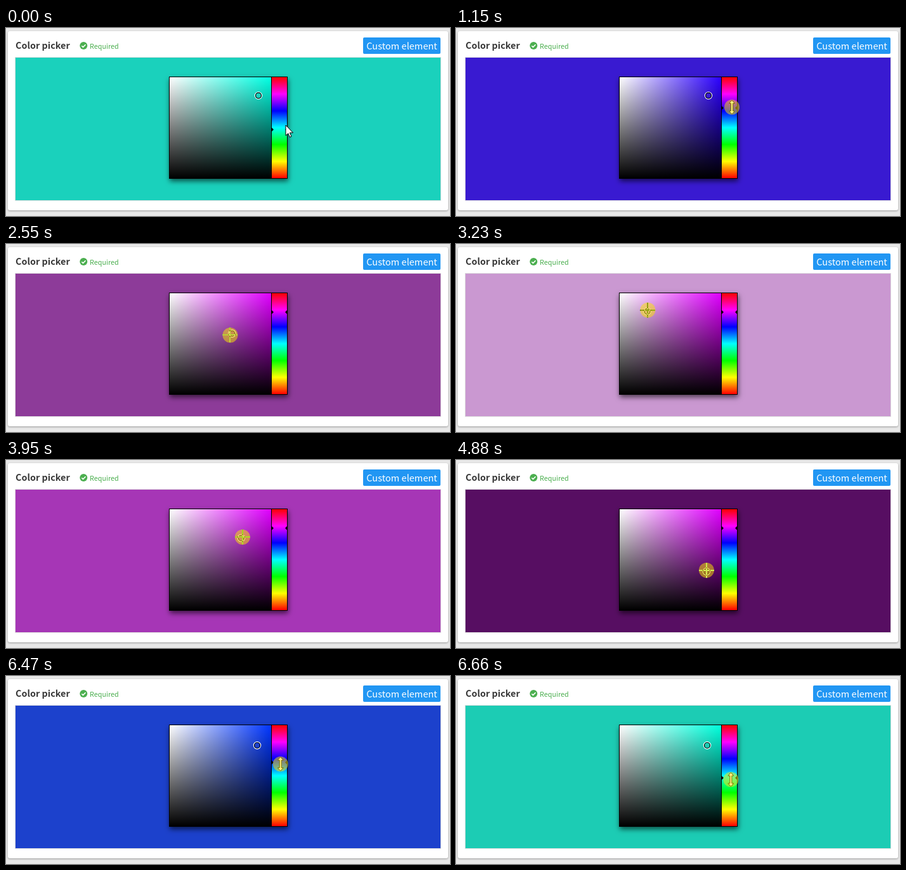
An HTML page with a canvas for the animation above (6680 ms loop, 700 px wide and 298 px high).

```html
<!DOCTYPE html>
<html lang="en">
<meta charset="utf-8">
<title>Color picker</title>
<style>
  html, body { margin: 0; width: 700px; height: 298px; overflow: hidden; background: #e8e8e8; }
  body { position: relative; font-family: "Noto Sans CJK JP", "Noto Sans CJK SC", "Noto Sans CJK", "Open Sans", sans-serif; }
  body * { position: absolute; white-space: nowrap; }
  .card { left: 3px; top: 5px; width: 694px; height: 284px; background: #fff; border-radius: 3px; box-shadow: 0 1px 3px rgba(0,0,0,.35); }
  .title { left: 15px; top: 15px; font-size: 14.4px; line-height: 24px; font-weight: 700; color: #3a3a3a; }
  .check { left: 116px; top: 22px; }
  .required { left: 132px; top: 16px; font-size: 10.8px; line-height: 24px; color: #4caf50; }
  .button { left: 563px; top: 15px; width: 122px; height: 26px; border-radius: 2px; background: #2196f3; color: #fff; font-size: 14.6px; line-height: 26px; text-align: center; }
  canvas { left: 15px; top: 47px; box-shadow: 0 0 0 1px #ddd; }
</style>
<body>
<div class="card"></div>
<div class="title">Color picker</div>
<svg class="check" width="13" height="13"><circle cx="6.3" cy="6" r="6" fill="#4caf50"/><path d="M3.3 6.2l2.2 2.2 4-4.2" fill="none" stroke="#fff" stroke-width="1.6"/></svg>
<div class="required">Required</div>
<div class="button">Custom element</div>
<canvas width="670" height="226"></canvas>
<script>
const LOOP = 6680, LAG = 20;
const LEFT = 258, TOP = 78, SIZE = 160, STRIP = 419;
// Dragging the hue, then the shade, then the hue again
const HUE_START = 225, HUE_END = 1590;
const SHADE_START = 2080, SHADE_END = 5500;
const REHUE_START = 6080;
const ctx = document.querySelector('canvas').getContext('2d');

// Turning points of the pointer on each axis: time, position
const turnsX = [
  [0, 441], [240, 435], [1750, 435], [2050, 398], [SHADE_START, 398],
  [3090, 299], [4330, 394], [SHADE_END, 396], [5650, 396], [6100, 432], [7000, 434]
];
const turnsY = [
  [0, 154], [240, 161], [450, 161], [HUE_END, 108], [2180, 107],
  [2740, 158], [3350, 99], [3830, 128], [4160, 109], [4650, 189],
  [SHADE_END, 110], [5650, 110], [5880, 104], [REHUE_START, 108], [7000, 189]
];

const clamp = (v, lo, hi) => Math.min(hi, Math.max(lo, v));

// Ease in and out between neighbouring turning points
function ease(turns, t) {
  const i = turns.findIndex(([time]) => time > t);
  const [t0, a] = turns[i - 1], [t1, b] = turns[i];
  const u = (t - t0) / (t1 - t0);
  return a + (b - a) * u * u * (3 - 2 * u);
}

function hsv(h, s, v) {
  const l = v * (1 - s / 2);
  return `hsl(${h},${100 * (v - l) / Math.min(l, 1 - l)}%,${100 * l}%)`;
}

function gradient(x0, y0, x1, y1, colors) {
  const g = ctx.createLinearGradient(x0, y0, x1, y1);
  colors.forEach((c, i) => g.addColorStop(i / (colors.length - 1), c));
  return g;
}

function rect(fill, x, y, w, h) {
  ctx.fillStyle = fill;
  ctx.fillRect(x, y, w, h);
}

function circle(x, y, r) {
  ctx.beginPath();
  ctx.arc(x, y, r, 0, 7);
}

function ring(x, y, r, color) {
  circle(x, y, r);
  ctx.strokeStyle = color;
  ctx.lineWidth = 1.2;
  ctx.stroke();
}

function shape(x, y, d, fill, outline) {
  const p = new Path2D(d);
  ctx.save();
  ctx.translate(x, y);
  ctx.fillStyle = fill;
  ctx.fill(p);
  if (outline) {
    ctx.strokeStyle = outline;
    ctx.lineWidth = 1;
    ctx.stroke(p);
  }
  ctx.restore();
}

function drawPicker(hueY, hue, x, y) {
  ctx.save();
  ctx.shadowColor = 'rgba(0,0,0,.6)';
  ctx.shadowBlur = 8;
  ctx.shadowOffsetY = 4;
  ctx.shadowOffsetX = 1;
  rect('#000', LEFT - 1, TOP - 1, 187, SIZE + 2);
  ctx.restore();
  const area = [LEFT, TOP, SIZE, SIZE];
  rect(gradient(LEFT, 0, LEFT + SIZE, 0, ['#fff', `hsl(${hue},100%,50%)`]), ...area);
  rect(gradient(0, TOP, 0, TOP + SIZE, ['rgba(0,0,0,0)', '#000']), ...area);
  rect(gradient(0, TOP, 0, TOP + SIZE, ['#f00', '#f0f', '#00f', '#0ff', '#0f0', '#ff0', '#f00']), STRIP, TOP, 24, SIZE);
  shape(STRIP - 1, hueY, 'M0-4L4 0 0 4z', '#000');
  shape(STRIP + 25, hueY, 'M0-4L-4 0 0 4z', '#000');
  ring(x, y, 5.6, '#fff');
  ring(x, y, 4.5, '#000');
}

function drawPointer(t, x, y) {
  if (t < 130) {
    shape(x, y, 'M0 0V16.5L3.8 13 6.4 19 9 18 6.5 12H11.5z', '#fff', '#000');
  } else if (x > STRIP) {
    shape(x, y, 'M0-11L4.5-6H1.5V6H4.5L0 11-4.5 6H-1.5V-6H-4.5z', '#fff', '#000');
  } else {
    // Crosshair that inverts what lies under it
    x = Math.round(x);
    y = Math.round(y);
    ctx.globalCompositeOperation = 'difference';
    rect('#fff', x - 12, y - 1, 24, 2);
    rect('#fff', x - 1, y - 12, 2, 11);
    rect('#fff', x - 1, y + 1, 2, 11);
    ctx.globalCompositeOperation = 'source-over';
  }
}

function draw() {
  const t = performance.now() % LOOP;
  const px = ease(turnsX, t), py = ease(turnsY, t);

  // The picker follows the pointer slightly late
  const late = t - LAG;
  const hueTime = t < SHADE_END ? clamp(late, 240, HUE_END) : Math.max(late, REHUE_START);
  const shadeTime = clamp(late, SHADE_START, SHADE_END);
  const hueY = ease(turnsY, hueTime);
  const x = ease(turnsX, shadeTime), y = ease(turnsY, shadeTime);
  const hue = 360 * (1 - (hueY - TOP) / SIZE);

  ctx.setTransform(1, 0, 0, 1, -15, -47);
  rect(hsv(hue, (x - LEFT) / SIZE, 1 - (y - TOP) / SIZE), 15, 47, 670, 226);
  drawPicker(hueY, hue, x, y);
  drawPointer(t, px, py);

  const pressed = t > HUE_START && t < HUE_END || t > SHADE_START && t < SHADE_END || t > REHUE_START;
  if (pressed) {
    circle(px, py, 12);
    ctx.fillStyle = 'rgba(255,230,0,.5)';
    ctx.fill();
  }
  requestAnimationFrame(draw);
}
draw();
</script>
</body>
</html>
```
